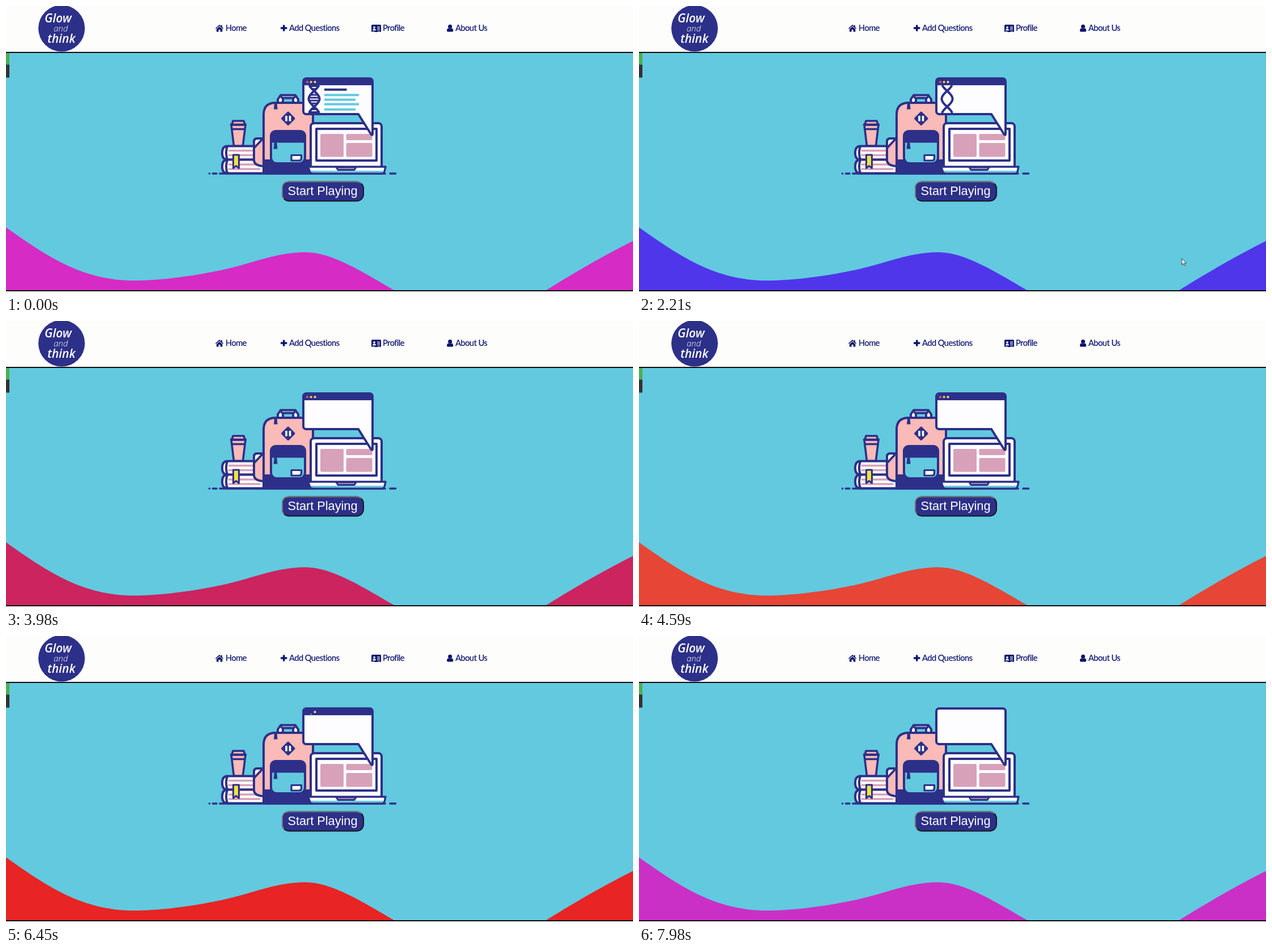
An HTML page that plays this animation: 1105x507 px, repeating every 8 s.

```html
<!DOCTYPE html>
<html lang="en">
<head>
<meta charset="utf-8">
<title>Learning page</title>
<style>
html, body { margin: 0; width: 100%; height: 100%; overflow: hidden; background: #fdfdfc; }
svg { display: block; width: 1105px; height: 507px; }

.nav { font: 14.6px Lato, sans-serif; letter-spacing: -.5px; fill: #0b146f; stroke: #0b146f; stroke-width: .2; }
.icons { fill: #0b146f; }
.brand { font: italic 600 21px "Open Sans", sans-serif; fill: #fff; }
.brand .small { font-size: 15px; font-weight: 300; }
.play { font: 21.7px "Liberation Sans", Arial, sans-serif; fill: #fff; }

.ink { stroke: #2d3088; stroke-width: 4; stroke-linejoin: round; }
.line { fill: none; stroke: #2d3088; stroke-width: 3.6; stroke-linecap: round; }
.navy { fill: #2d3088; }
.pink { fill: #f9bab8; }
.white { fill: #fdfdff; }
.cyan { fill: #62c9df; }
.mauve { fill: #d7a1b9; }
.pages { stroke: #d7a1b9; stroke-width: 3.4; stroke-linecap: round; }
.teal { stroke: #62c9df; }

.wave, .cursor, .draw, .dot, .bar { animation: 8s linear infinite; }
.wave { animation-name: tint; }
.cursor { animation-name: roam; }
.draw { fill: none; stroke-width: 4; stroke-dasharray: 1 2; }
.long { animation-name: long; }
.short { animation-name: short; }
.title { animation-name: title; }
.rung { animation-name: rung; stroke-width: 3; }
.strand { animation-name: strand; }
.steam { animation-name: steam; }
.d1 { animation-name: drop1; }
.d2 { animation-name: drop2; }
.d3 { animation-name: drop3; }
.dot { transform-box: fill-box; transform-origin: center; }
.bar { animation-name: fold; transform-origin: 0 128px; }

@keyframes tint {
  0% { fill: rgb(214,43,196); }
  16% { fill: rgb(138,36,228); }
  31.25% { fill: rgb(62,59,236); }
  37.25% { fill: rgb(84,55,214); }
  49.75% { fill: rgb(204,36,95); }
  52.5% { fill: rgb(226,34,73); }
  66% { fill: rgb(240,130,17); }
  80.6% { fill: rgb(232,36,36); }
  84% { fill: rgb(231,37,46); }
  95% { fill: rgb(210,46,186); }
  99.75%, 100% { fill: rgb(203,48,198); }
}
@keyframes roam {
  0%, 3.5% { transform: translate(1032px, 515px); }
  7% { transform: translate(985px, 482px); }
  10% { transform: translate(950px, 460px); }
  13% { transform: translate(938px, 449px); }
  16%, 21% { transform: translate(934px, 446px); }
  31% { transform: translate(968px, 446px); }
  34% { transform: translate(1012px, 455px); }
  37.25% { transform: translate(1063px, 462.5px); }
  40%, 100% { transform: translate(1110px, 470px); }
}
@keyframes long { 0%, 15.6% { stroke-dashoffset: 0; } 19.5%, 100% { stroke-dashoffset: -1; } }
@keyframes short { 0%, 13.5% { stroke-dashoffset: 0; } 17.4%, 100% { stroke-dashoffset: -1; } }
@keyframes title { 0%, 17.5% { stroke-dashoffset: 0; } 21.5%, 100% { stroke-dashoffset: -1; } }
@keyframes rung { 0%, 13% { stroke-dashoffset: 0; } 19.5%, 100% { stroke-dashoffset: -1; } }
@keyframes strand { 0%, 36.5% { stroke-dashoffset: 0; } 44%, 100% { stroke-dashoffset: -1; } }
@keyframes steam {
  0%, 28% { stroke-dashoffset: 1; }
  33%, 37.5% { stroke-dashoffset: 0; }
  42%, 100% { stroke-dashoffset: -1; }
}
@keyframes drop1 { 0%, 75% { transform: none; } 79.5%, 100% { transform: translateY(8px) scale(0); } }
@keyframes drop2 { 0%, 78.4% { transform: none; } 82.9%, 100% { transform: translateY(8px) scale(0); } }
@keyframes drop3 { 0%, 80.8% { transform: none; } 84.3%, 100% { transform: translateY(8px) scale(0); } }
@keyframes fold { 0%, 86% { transform: none; } 93%, 100% { transform: scaleY(0); } }
</style>
</head>
<body>
<svg viewBox="0 0 1105 507">
  <rect width="1105" height="507" fill="#fdfdfc"/>

  <circle cx="98" cy="39.5" r="41" fill="#2d3088"/>
  <g class="brand">
    <text x="68" y="29">Glow</text>
    <text class="small" x="84" y="45">and</text>
    <text x="73" y="65">think</text>
  </g>

  <g class="nav">
    <text x="387" y="44">Home</text>
    <text x="499" y="44">Add Questions</text>
    <text x="664" y="44">Profile</text>
    <text x="792" y="44">About Us</text>
  </g>
  <g class="icons">
    <path d="M369 39.5l7.2-6.5 2.8 2.5V34h2v3.3l2.2 2.2-1 1.1-6-5.4-6.1 5.4z"/>
    <path d="M371 41l5.2-4.6 5.2 4.6v4.5h-3.7v-3.7h-3v3.7H371z"/>
    <path d="M488 33.5h3.4v3.8h3.9v3.4h-3.9v3.8H488v-3.8h-3.9v-3.4h3.9z"/>
    <rect x="644" y="33" width="17" height="13" rx="1.5"/>
    <g fill="#fdfdfc">
      <circle cx="649" cy="37.8" r="1.9"/>
      <path d="M646 43.2q0-3 3-3t3 3zM654 36.5h5v1.2h-5zM654 39.2h5v1.2h-5zM654 41.9h5v1.2h-5zM645.5 45h4v1h-4zM655 45h4v1h-4z"/>
    </g>
    <circle cx="782.6" cy="36.3" r="3.5"/>
    <path d="M777 43.8q0-4.6 3.2-4.6 2.4 1.3 4.8 0 3.2 0 3.2 4.6 0 1.7-1.6 1.7h-8q-1.6 0-1.6-1.7z"/>
  </g>

  <rect y="81" width="1105" height="423" fill="#0b0b0e"/>
  <rect class="cyan" y="83" width="1105" height="419"/>
  <path class="wave" d="M0 391C74 444 137 485 225 485C280 485 350 474 395 463S480 435 527 435C575 435 630 471 684 502H0zM952 502Q1030 453 1105 415V502z"/>
  <rect y="83" width="6" height="20.5" fill="#4caf50"/>
  <rect y="103.5" width="6" height="23" fill="#333"/>

  <!-- ground -->
  <path class="line" d="M358.500 296h.1M364.500 296h6.500M377 296H668M677 296h9.500"/>

  <!-- books -->
  <g class="ink">
    <path class="white" d="M452 247.500H389q-8 1-8 12t8 12h63z"/>
    <path class="white" d="M454 271.500H389q-8 1-8 12t8 12h65z"/>
    <path fill="none" d="M390 248q-4 11.500 0 23M390 272q-4 11.500 0 23"/>
  </g>
  <path class="pages" d="M393 255.500H436M393 263.500H436M393 280H447M393 288H447"/>
  <path d="M400.500 263h10v23.500l-5-4-5 4z" fill="#f0e23f" class="ink" style="stroke-width:3"/>

  <!-- cup -->
  <g class="ink pink" style="stroke-width:3.600">
    <path d="M397 210h25l-4.500 37H401.500z"/>
    <path d="M400 203h19l2 6.500H398z"/>
    <path d="M395 209.500h29M398 217.500h23"/>
  </g>
  <path class="line draw steam" pathLength="1" d="M406 197c6-7-5-11-1-19"/>
  <path class="line draw steam" pathLength="1" d="M414 197c6-7-5-11-1-19"/>

  <!-- backpack -->
  <path class="ink white" d="M479 171v-6l5-7.500h26l5 7.500v6z"/>
  <path class="ink cyan" d="M488 171v-8.500h18v8.500z"/>
  <path class="line" d="M484 158l2 4M510 158l-2 4"/>
  <path class="ink pink" d="M454 234h-11q-6 0-6 6v32q0 10 17 11z"/>
  <path class="ink white" d="M453 234h-10q-6 0-6 6v11z"/>
  <path class="ink pink" d="M454 295V192q0-21 21-21h45q21 0 21 21v103z"/>
  <path class="navy" d="M452 271h90v27h-84q-6 0-6-6z"/>
  <path class="navy" d="M473 171h4.500l1 11.500h-6.500z"/>
  <rect class="navy" x="488" y="189.500" width="18.500" height="18.500" rx="2.500" transform="rotate(45 497.250 198.750)"/>
  <path d="M494 194v9.500M500.500 194v9.500" stroke="#fdfdff" stroke-width="3.600"/>
  <rect class="ink cyan" x="467" y="221" width="60" height="57" rx="10"/>
  <path class="navy" d="M465 241.500V231q0-12 12-12h40q12 0 12 12v10.500z"/>
  <path class="navy" d="M473 240h4l1.500 12.500h-7z"/>
  <path class="ink white" style="stroke-width:3.200" d="M503 263.500h17.500v5.500q0 4-4 4H503z"/>

  <!-- laptop -->
  <rect class="ink white" x="537" y="207" width="125" height="80" rx="6"/>
  <rect class="ink white" x="547" y="217" width="106" height="56"/>
  <g class="mauve">
    <rect x="554" y="226" width="41" height="40.500" rx="2"/>
    <rect x="599.500" y="226" width="46" height="11" rx="2"/>
    <rect x="599.500" y="242" width="46" height="24.500" rx="2"/>
  </g>
  <path class="ink white" style="stroke-width:3.400" d="M533 284h136l-2 8q-1 4-5 4H541q-6 0-8-12z"/>
  <path d="M538 292.500H664" stroke="#62c9df" stroke-width="3"/>
  <path class="ink mauve" style="stroke-width:3" d="M582 285h35l-3 4.500h-29z"/>

  <!-- speech bubble -->
  <path class="ink white" d="M529 128H641a5 5 0 0 1 5 5V225q0 5-3 1L621 191H529a5 5 0 0 1-5-5V133a5 5 0 0 1 5-5z"/>
  <path class="navy bar" d="M524 140V132q0-4 4-4H642q4 0 4 4v8z"/>
  <circle class="dot d1" cx="531" cy="134.300" r="2" fill="#d9596f"/>
  <circle class="dot d2" cx="537.600" cy="134.300" r="2" fill="#f0d63f"/>
  <circle class="dot d3" cx="544.500" cy="134.300" r="2" fill="#efe28a"/>
  <path class="draw title" stroke="#2d3088" pathLength="1" d="M561 147.700H600.500"/>
  <path class="draw teal long" pathLength="1" d="M561 157.300H622"/>
  <path class="draw teal short" pathLength="1" d="M561 165.500H616"/>
  <path class="draw teal long" pathLength="1" d="M561 173.500H622"/>
  <path class="draw teal short" pathLength="1" d="M561 182.700H616"/>
  <g id="helix" stroke="#2d3088"></g>

  <!-- button -->
  <rect x="487" y="310.500" width="143" height="34" rx="12" fill="#2d3088" stroke="#17171f" stroke-width="2"/>
  <path d="M490 341q-3-3-3-8.500V322.500q0-12 12-12H618q5 0 8.500 3" fill="none" stroke="#767680" stroke-width="2"/>
  <text class="play" x="496.500" y="334">Start Playing</text>

  <path class="cursor" d="M0 0v11l2.500-2.300 1.700 3.800 1.900-.8-1.700-3.700h3.400z" fill="#fff" stroke="#222" stroke-width=".9"/>
</svg>
<script>
const helix = document.getElementById("helix");
const swing = y => 9.5 * Math.cos(Math.PI * (y - 164) / 28);

function addPath(d, kind) {
  const path = document.createElementNS("http://www.w3.org/2000/svg", "path");
  path.setAttribute("d", d);
  path.setAttribute("pathLength", 1);
  path.setAttribute("class", "draw " + kind);
  helix.append(path);
}

for (const side of [-1, 1]) {
  let d = "";
  for (let y = 140; y <= 189; y++) d += `${d ? "L" : "M"}${543 + side * swing(y)} ${y}`;
  addPath(d, "strand");
}
for (const y of [141.5, 146.5, 157, 162, 167, 172, 182.5, 187.5]) {
  const half = Math.abs(swing(y));
  addPath(`M${543 - half} ${y}H${543 + half}`, "rung");
}
</script>
</body>
</html>
```
